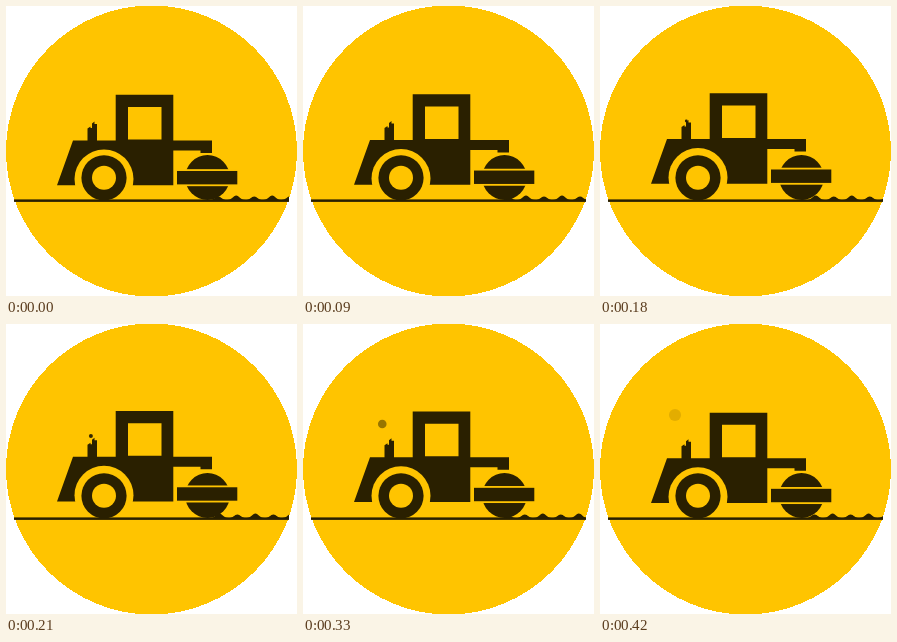
An HTML page for the animation above (450 ms loop, 291x290 px).

```html
<!DOCTYPE html>
<html lang="en">
<head>
<meta charset="utf-8">
<title>Road roller</title>
<style>
  html, body { margin: 0; width: 100%; height: 100%; overflow: hidden; background: #fff; }
  svg { display: block; }
  .sun { fill: #ffc400; }
  .ink { fill: #2a2000; }
</style>
</head>
<body>
<svg width="291" height="290" viewBox="0 0 291 290">
  <clipPath id="road"><rect x="201" y="185" width="82" height="11"/></clipPath>
  <circle class="sun" cx="145.5" cy="145" r="145.5" shape-rendering="crispEdges"/>
  <circle id="puff" class="ink"/>
  <g id="body">
    <path class="ink" fill-rule="evenodd" d="M109.7 87.8H167.3V133.5H206V146H194.5V143.5H167.3V178.2H51L67 133.5H109.7ZM122 100V132.5H155.5V100Z"/>
    <path class="ink" d="M81.5 135V121.5L84.5 119.5V121H86V116.5L88.5 114.5V117H91V135Z"/>
    <circle class="sun" cx="98" cy="172" r="29.5"/>
  </g>
  <circle class="ink" cx="98" cy="171.8" r="22.6"/>
  <circle class="sun" cx="98" cy="171.8" r="12"/>
  <rect class="ink" x="8" y="193.4" width="275" height="2.5"/>
  <g clip-path="url(#road)"><path id="bumps" class="ink"/></g>
  <circle class="ink" cx="201.5" cy="171.5" r="22.4"/>
  <g id="yoke">
    <rect class="sun" x="170" y="162.2" width="62" height="17"/>
    <rect class="ink" x="171" y="164" width="60.3" height="13.4"/>
  </g>
</svg>
<script>
const LOOP = 450, STEP = 30, PITCH = 18;
const get = id => document.getElementById(id);
const [bumps, puff, body, yoke] = ["bumps", "puff", "body", "yoke"].map(get);

// tall and low bumps alternate
function bumpPath(shift) {
  let d = "";
  for (let i = 0; i < 8; i++) {
    const x = 194.2 + i * PITCH - shift, top = i % 2 ? 190.4 : 189.6;
    d += `M${x - 9} 194C${x - 4} 194 ${x - 3} ${top} ${x} ${top}S${x + 4} 194 ${x + 9} 194Z`;
  }
  return d;
}

function draw(t) {
  const bob = `translate(0 ${0.1 + 0.9 * Math.cos(2 * Math.PI * (t - 15) / LOOP)})`;
  body.setAttribute("transform", bob);
  yoke.setAttribute("transform", bob);
  bumps.setAttribute("d", bumpPath(2 * PITCH * t / LOOP));

  const age = t - 180;
  puff.setAttribute("cx", 86.3 - 0.047 * age);
  puff.setAttribute("cy", 115 - 0.1 * age);
  puff.setAttribute("r", Math.max(0, 1.4 + 0.0195 * age));
  puff.setAttribute("opacity", age < 0 ? 0 : Math.min(1, 1.07 - 0.0039 * age));
}

function tick() {
  draw(Math.floor(performance.now() % LOOP / STEP) * STEP);
  requestAnimationFrame(tick);
}
tick();
</script>
</body>
</html>
```
